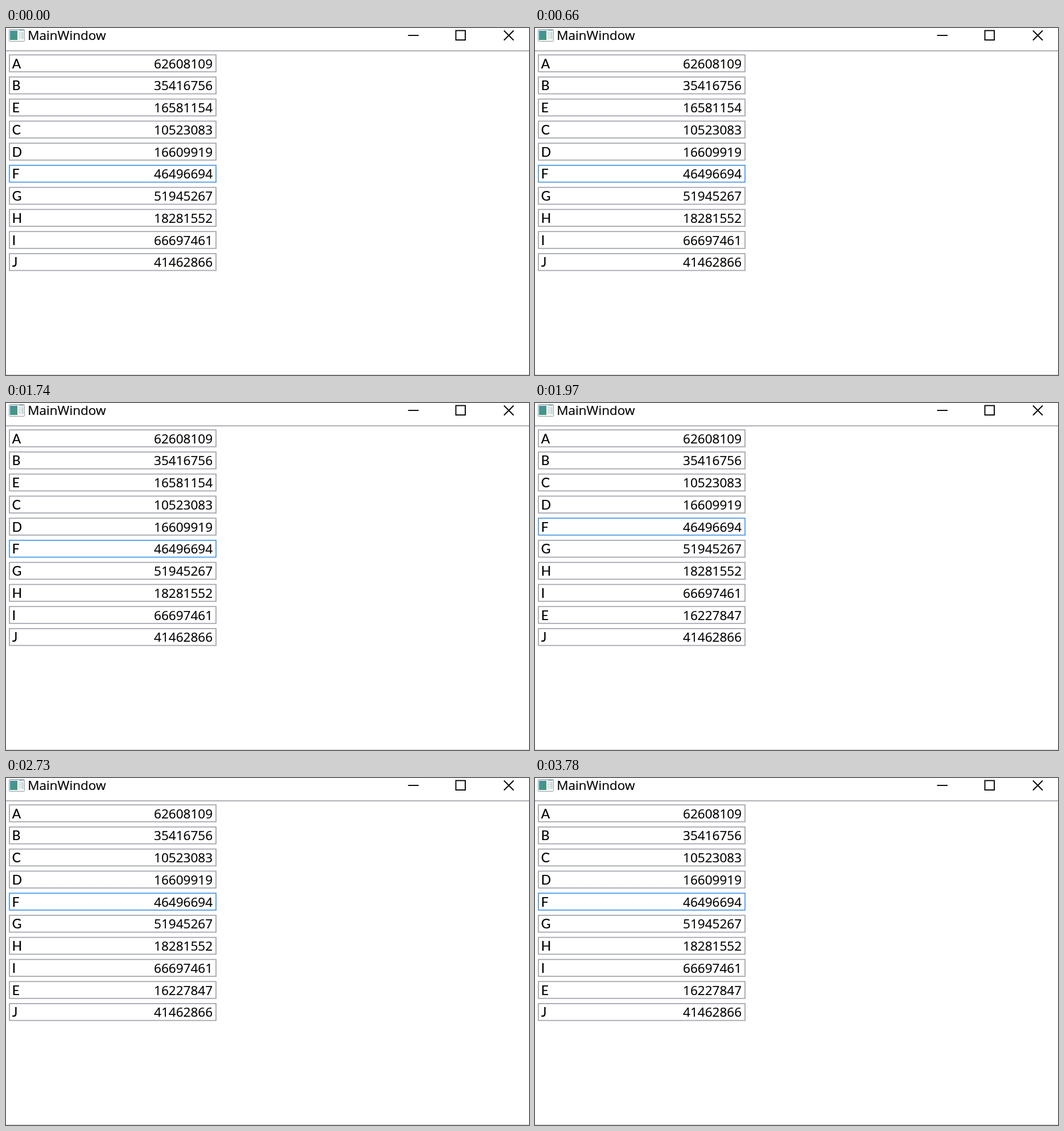
Animation, 919 px wide and 609 px high, one loop 3.86 s. Source, as an HTML page:

```html
<!DOCTYPE html>
<html lang="en">
<head>
<meta charset="utf-8">
<title>MainWindow</title>
<style>
  html, body { margin: 0; width: 100%; height: 100%; overflow: hidden; background: #fff; }
  svg { display: block; width: 919px; height: 609px; }
  text {
    font: 22.5px "Open Sans", "Noto Sans", sans-serif;
    fill: #000; stroke: #000; stroke-width: 0.2;
  }
  .field rect { fill: #fff; stroke: #a5a7af; stroke-width: 1.8; }
  .field.focused rect { stroke: #4f9ce6; }
  .name { font: 22.8px Lato, sans-serif; }
  .amount { text-anchor: end; }
  .controls { fill: none; stroke: #000; stroke-width: 1.9; }
</style>
</head>
<body>
<svg viewBox="0 0 919 609">
  <defs>
    <linearGradient id="panel" x2="1" y2="1">
      <stop offset="0" stop-color="#4a8fa8"/>
      <stop offset="1" stop-color="#3f9c72"/>
    </linearGradient>
  </defs>
  <g id="icon">
    <rect x="5.5" y="2.5" width="27" height="21" rx="1" fill="#f3f6f7" stroke="#979fa4"/>
    <path d="M6 4H32" stroke="#d5dde2" stroke-width="2"/>
    <path d="M24 4H31" stroke="#6f9fc4" stroke-width="2" stroke-dasharray="1.5 1"/>
    <rect x="7" y="5" width="13" height="16" fill="url(#panel)"/>
    <path d="M22 8.5H26M22 11.5H26M22 14.5H26M22 17.5H26" stroke="#b5bec5"/>
    <rect x="27" y="7" width="4" height="12" fill="#cfdbd8"/>
  </g>
  <text x="38.3" y="21">MainWindow</text>
  <g class="controls">
    <path d="M706.5 13H725"/>
    <rect x="790.5" y="4.5" width="16.5" height="16.5"/>
    <path d="M875 4.5L892 21.5M892 4.5L875 21.5"/>
  </g>
  <rect y="39.3" width="919" height="1.7" fill="#a4a3a9"/>
  <rect y="608" width="919" height="1" fill="#d3c8d3"/>
  <g id="fields"></g>
  <rect id="caret" x="21.7" width="1.4" height="27" fill="#000"/>
</svg>
<script>
const LOOP = 3860;
const REORDER_AT = 1970;
const CARET_SPANS = [[160, 660], [1130, 1740], [2200, 2730], [3190, 3780]];
const amounts = {
  A: 62608109, B: 35416756, C: 10523083, D: 16609919, E: 16581154,
  F: 46496694, G: 51945267, H: 18281552, I: 66697461, J: 41462866
};
const updatedE = 16227847;
const fields = document.getElementById("fields");
const caret = document.getElementById("caret");

function add(parent, tag, attributes) {
  const node = document.createElementNS("http://www.w3.org/2000/svg", tag);
  for (const [key, value] of Object.entries(attributes)) node.setAttribute(key, value);
  return parent.appendChild(node);
}

const rowTop = index => 46.3 + 38.75 * index;

const rows = Array.from({ length: 10 }, (_, index) => {
  const top = rowTop(index);
  const baseline = top + 24.2;
  const group = add(fields, "g", { class: "field" });
  add(group, "rect", { x: 6, y: top + 0.9, width: 363, height: 29.6 });
  return {
    group,
    name: add(group, "text", { class: "name", x: 10.7, y: baseline }),
    amount: add(group, "text", { class: "amount", x: 363, y: baseline })
  };
});

function draw(time) {
  const reordered = time >= REORDER_AT;
  const order = reordered ? "ABCDFGHIEJ" : "ABECDFGHIJ";
  rows.forEach((row, index) => {
    const name = order[index];
    row.name.textContent = name;
    row.amount.textContent = reordered && name === "E" ? updatedE : amounts[name];
    row.group.classList.toggle("focused", name === "F");
  });
  const blinkOn = CARET_SPANS.some(([start, end]) => time >= start && time < end);
  caret.setAttribute("y", rowTop(order.indexOf("F")) + 2.5);
  caret.setAttribute("visibility", blinkOn ? "visible" : "hidden");
}

const startTime = performance.now();
function tick() {
  draw((performance.now() - startTime) % LOOP);
  requestAnimationFrame(tick);
}
tick();
</script>
</body>
</html>
```
